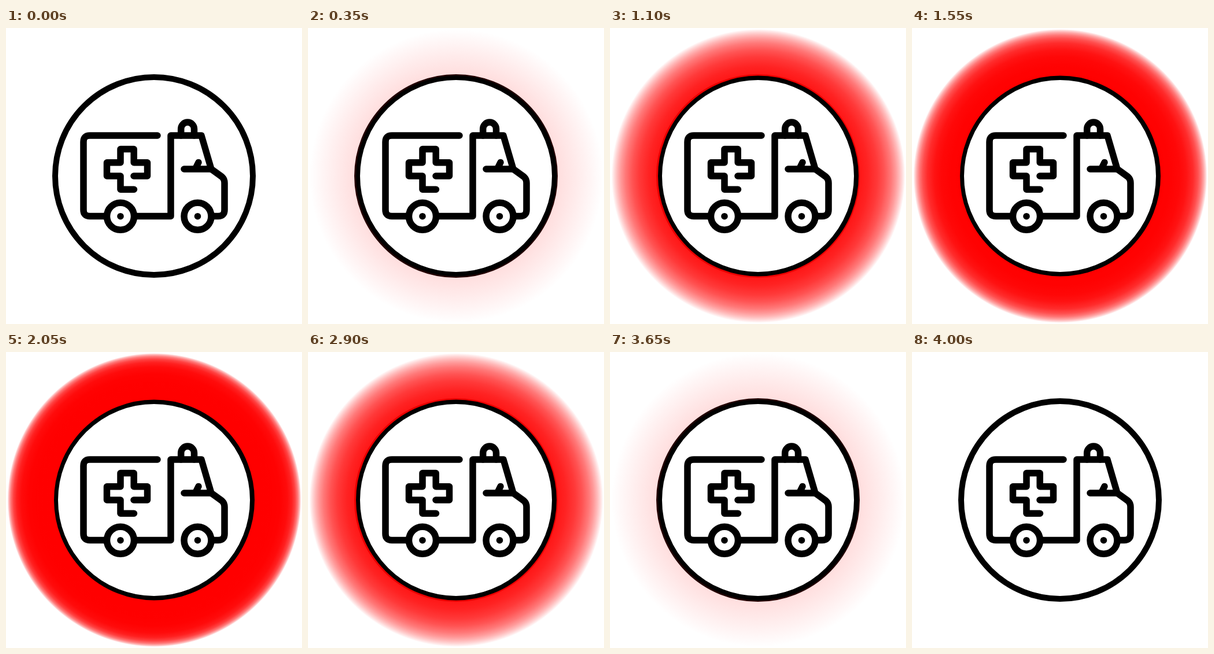
Recreate the animation shown at these times as an HTML page without scripts. Size 512 by 512 pixels, loop 4050 ms.

```html
<!DOCTYPE html>
<html lang="en">
<head>
<meta charset="utf-8">
<title>Ambulance beacon</title>
<style>
  @property --n { syntax: "<number>"; inherits: true; initial-value: 0; }

  html, body { margin: 0; width: 100%; height: 100%; overflow: hidden; background: #fff; }

  svg { display: block; width: 100vw; height: 100vh; animation: pulse 4050ms infinite; }

  /* 40 steps up, 40 steps down, one step of rest */
  @keyframes pulse {
    0% { --n: 0; animation-timing-function: steps(40, end); }
    49.3827% { --n: 40; animation-timing-function: steps(40, end); }
    98.7654%, 100% { --n: 0; }
  }

  /* --s: strength from the inner rim (1) to the outer rim (0) */
  stop {
    stop-color: #f00;
    stop-opacity: calc(1 - exp(-2.5 * var(--s) * pow(var(--n) / 22, 2.5)));
  }

  .line { fill: none; stroke: #000; stroke-width: 11.5; stroke-linecap: round; stroke-linejoin: round; }
</style>
</head>
<body>
<svg viewBox="0 0 512 512">
  <defs>
    <radialGradient id="glow" gradientUnits="userSpaceOnUse" cx="256.5" cy="256" r="254">
      <stop offset=".683" style="--s:1"/>
      <stop offset=".7465" style="--s:.8"/>
      <stop offset=".81" style="--s:.6"/>
      <stop offset=".857" style="--s:.45"/>
      <stop offset=".905" style="--s:.3"/>
      <stop offset=".9366" style="--s:.2"/>
      <stop offset=".9588" style="--s:.13"/>
      <stop offset=".9778" style="--s:.07"/>
      <stop offset=".9905" style="--s:.03"/>
      <stop offset="1" style="--s:0"/>
    </radialGradient>
    <g id="wheel">
      <circle class="line" r="23.5"/>
      <circle r="5.8"/>
    </g>
  </defs>

  <circle cx="256" cy="256" r="171" fill="none" stroke="#000" stroke-width="10"/>
  <circle cx="256.5" cy="256" r="213.75" fill="none" stroke="url(#glow)" stroke-width="80.5"/>

  <g class="line">
    <!-- body -->
    <path d="M262 186H145Q134 186 134 197V314.500Q134 325.500 145 325.500H173"/>
    <path d="M223 325.500H285V186H338L355 244L373 257Q378 261 378 268V314.500Q378 325.500 367 325.500H358"/>
    <!-- window and siren -->
    <path d="M308 244H355M333 232.500L328.500 241.500"/>
    <path d="M302.700 186V174.500A11.400 11.400 0 0 1 325.500 174.500V186"/>
    <!-- cross -->
    <path d="M221.500 279.200H198V256H174.500V232.800H198V209.500H221.200V232.800H244.500V256H221"/>
  </g>
  <use href="#wheel" x="198" y="325.700"/>
  <use href="#wheel" x="331.500" y="325.700"/>
</svg>
</body>
</html>
```
